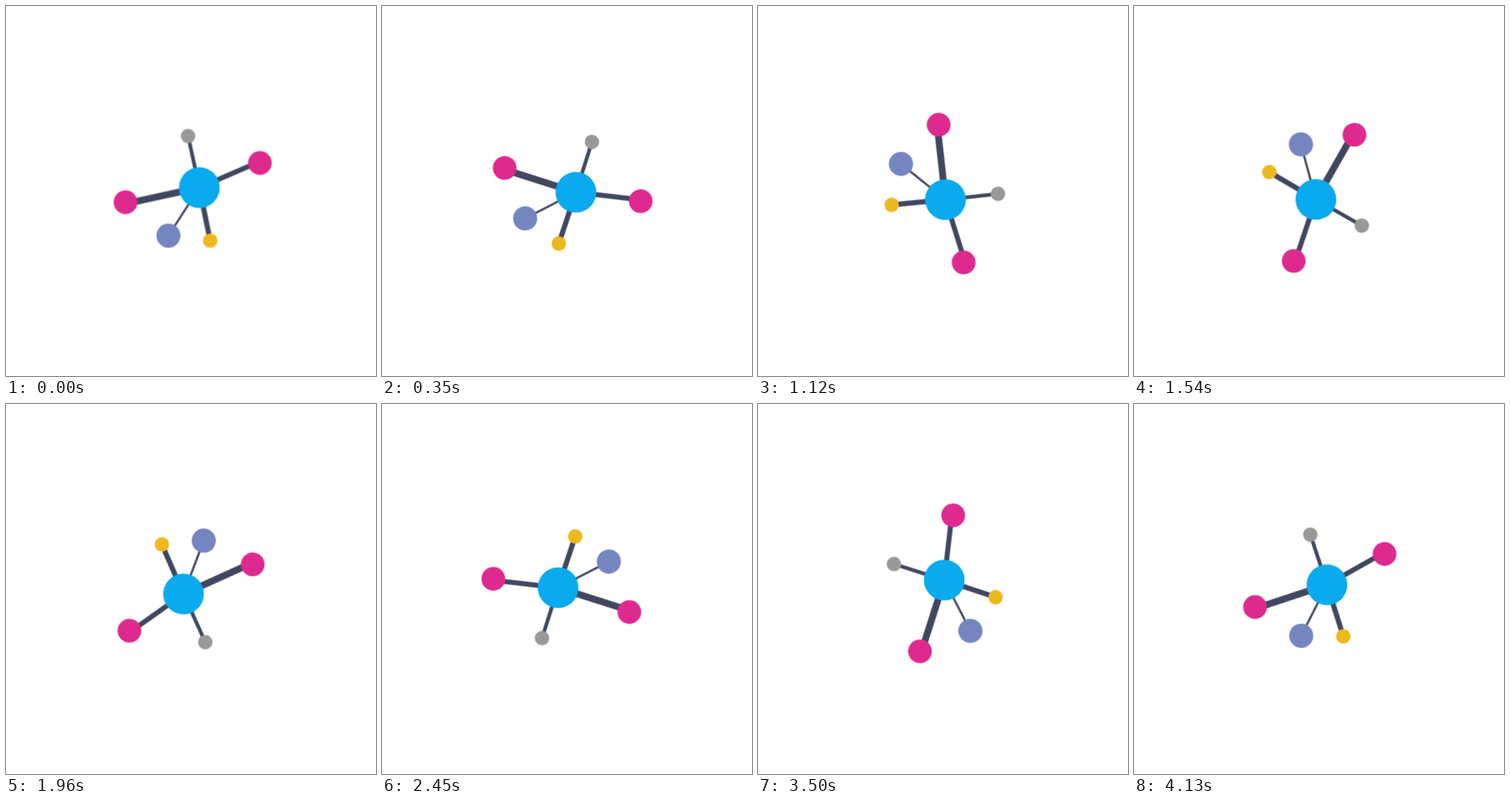
An HTML page that plays this animation: 443 by 443 pixels, repeating every 4.2 s.

```html
<!DOCTYPE html>
<html lang="en">
<head>
<meta charset="utf-8">
<title>Spinning network</title>
<style>
  html, body { margin: 0; width: 100%; height: 100%; overflow: hidden; background: #fff; }
  svg { display: block; width: 100%; height: 100%; }
  .net { animation: spin 4200ms steps(60) infinite; }
  .links { stroke: #40475f; }
  @keyframes spin { to { transform: rotate(360deg); } }
</style>
</head>
<body>
<svg viewBox="-221.5 -221.5 443 443">
  <g class="net">
    <g class="links">
      <line x1="10" y1="-4" x2="-77" y2="15" stroke-width="8"/>
      <line x1="10" y1="-4" x2="81.7" y2="-35" stroke-width="6"/>
      <line x1="10" y1="-4" x2="23" y2="59.5" stroke-width="6.2"/>
      <line x1="10" y1="-4" x2="-3.5" y2="-66" stroke-width="4.4"/>
      <line x1="10" y1="-4" x2="-27" y2="53.5" stroke-width="2.5"/>
    </g>
    <circle cx="-78.4" cy="13.5" r="14.2" fill="#de2a8f"/>
    <circle cx="82.5" cy="-33.5" r="14.2" fill="#de2a8f"/>
    <circle cx="-27" cy="53.5" r="14.4" fill="#7585c0"/>
    <circle cx="23" cy="59.4" r="8.7" fill="#eeb81f"/>
    <circle cx="-3.5" cy="-65.9" r="8.7" fill="#999"/>
    <circle cx="10" cy="-4" r="24.4" fill="#09aaee"/>
  </g>
</svg>
</body>
</html>
```
